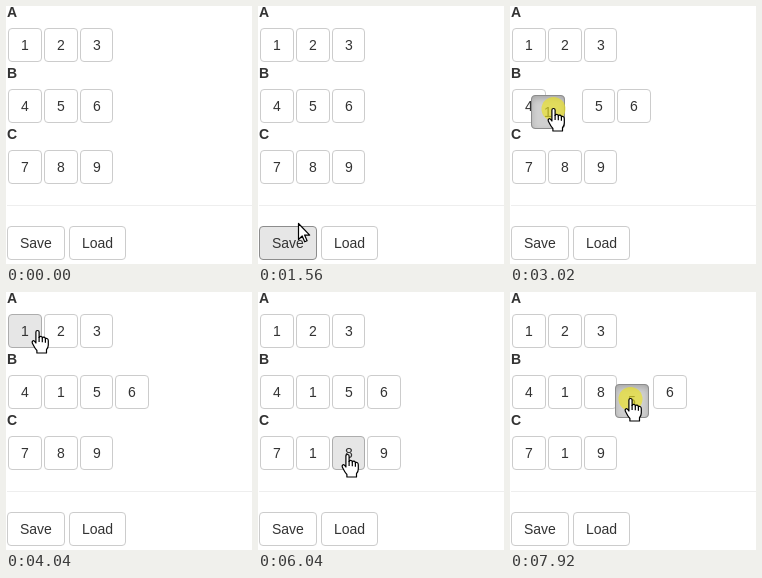
An HTML page with a canvas that plays this animation: 246 px wide and 258 px high, repeating every 7990 ms.

```html
<!DOCTYPE html>
<html lang="en">
<head>
<meta charset="utf-8">
<title>Sortable buttons</title>
<style>
  html, body { margin: 0; width: 100%; height: 100%; overflow: hidden; background: #fff; }
  canvas { display: block; width: 246px; height: 258px; }
</style>
</head>
<body>
<canvas id="stage"></canvas>
<script>
const W = 246, H = 258, LOOP = 7990;
const FONT = '14px "Liberation Sans", Arial, sans-serif';
const ITEM = 33.79, GAP = 2, ROW = 61;

const canvas = document.getElementById('stage');
const dpr = window.devicePixelRatio || 1;
canvas.width = W * dpr;
canvas.height = H * dpr;
const ctx = canvas.getContext('2d');

// Pointer moves: first step, last step, number of steps, destination.
const START = [195, 250];
const MOVES = [
  [150, 700, 8, 41, 235],
  [1410, 2180, 11, 24, 36],
  [2330, 3020, 10, 43, 103],
  [3190, 3190, 1, 44, 103],
  [3420, 4040, 9, 31, 39],
  [4120, 4180, 2, 29, 39],
  [4250, 4940, 10, 51, 158],
  [5110, 5330, 4, 58, 160],
  [5500, 6040, 8, 89, 163],
  [6200, 6740, 8, 80, 109],
  [6900, 6970, 2, 83, 108],
  [7460, 7690, 4, 124, 98],
  [7770, 7920, 3, 120, 107]
];

// Row contents over time; "_" is the open slot of the dragged item.
const LAYOUTS = [
  [0, '123/456/789'],
  [2330, '_23/456/789'],
  [2790, '123/4_56/789'],
  [3420, '123/4156/789'],
  [4250, '_23/4156/789'],
  [4480, '123/4_156/789'],
  [4780, '123/4156/7_89'],
  [5500, '123/4156/7189'],
  [6200, '123/4156/71_9'],
  [6580, '123/41_56/719'],
  [7220, '123/41856/719'],
  [7690, '123/418_6/719']
];

// Press, drop, label, grab offset.
const DRAGS = [
  [2330, 3420, '1', 22, 14],
  [4250, 5500, '1', 27, 17],
  [6200, 7220, '8', 15, 19],
  [7690, LOOP, '5', 15, 15]
];

const PRESSES = [[950, 1180], [2330, 3420], [4250, 5500], [6200, 7460], [7690, LOOP]];

const STYLES = {
  normal: ['#fff', '#ccc'],
  hover: ['#e6e6e6', '#adadad'],
  focus: ['#e6e6e6', '#8c8c8c'],
  active: ['#d0d0d0', '#8c8c8c']
};

const HAND = new Path2D('M-1.6 12.5V1.6Q-1.6 0 0 0Q1.6 0 1.6 1.6V7Q2.2 5.6 3.4 5.8Q4.8 6 4.8 7.6' +
  'Q5.4 6.4 6.6 6.7Q7.9 7 7.9 8.5Q8.5 7.6 9.5 8Q10.8 8.5 10.8 10.2V14.5Q10.8 17 9 19.2V22.5H-.6V20' +
  'Q-2.6 18-4.6 13.8Q-6 11.2-4.8 10.4Q-3.6 9.6-2.4 11.4Z');
const KNUCKLES = new Path2D('M1.6 6.5V11.5M4.8 7.5V11.8M7.9 8.5V12.2');
const ARROW = new Path2D('M0 0V16L3.7 12.5L6.2 18.3L8.6 17.2L6.1 11.6H11.2Z');

const within = (t, [from, to]) => t >= from && t < to;
const ease = p => p * p * (3 - 2 * p);

function pointerAt(t) {
  let [x, y] = START;
  for (const [from, to, steps, tx, ty] of MOVES) {
    if (t < from) break;
    const done = to > from ? (t - from) / (to - from) : 1;
    const step = Math.min(steps, Math.floor(done * (steps - 1) + 0.001) + 1);
    const p = ease(step / steps);
    x += (tx - x) * p;
    y += (ty - y) * p;
  }
  return { x, y };
}

function text(label, x, y, bold) {
  ctx.font = (bold ? 'bold ' : '') + FONT;
  ctx.fillStyle = '#333';
  ctx.fillText(label, x, y);
}

function button(label, x, y, w, state) {
  const [fill, border] = STYLES[state];
  ctx.beginPath();
  ctx.roundRect(x + 0.5, y + 0.5, w - 1, 33, 3.5);
  ctx.fillStyle = fill;
  ctx.fill();
  if (state === 'active') insetShadow(x, y, w);
  ctx.beginPath();
  ctx.roundRect(x + 0.5, y + 0.5, w - 1, 33, 3.5);
  ctx.lineWidth = 1;
  ctx.strokeStyle = border;
  ctx.stroke();
  text(label, x + 13, y + 22);
}

function insetShadow(x, y, w) {
  ctx.save();
  ctx.clip();
  ctx.beginPath();
  ctx.rect(x - 20, y - 20, w + 40, 74);
  ctx.roundRect(x, y, w, 34, 4);
  ctx.shadowColor = 'rgba(0,0,0,.22)';
  ctx.shadowBlur = 7 * dpr;
  ctx.shadowOffsetY = 3 * dpr;
  ctx.fillStyle = '#000';
  ctx.fill('evenodd');
  ctx.restore();
}

function cursor({ x, y }, hand) {
  ctx.save();
  ctx.translate(Math.round(x) + 0.5, Math.round(y) - 0.5);
  ctx.lineJoin = 'round';
  ctx.lineWidth = 1.2;
  ctx.fillStyle = '#fff';
  ctx.strokeStyle = '#000';
  const shape = hand ? HAND : ARROW;
  ctx.fill(shape);
  ctx.stroke(shape);
  if (hand) ctx.stroke(KNUCKLES);
  ctx.restore();
}

function draw(t) {
  ctx.setTransform(dpr, 0, 0, dpr, 0, 0);
  ctx.fillStyle = '#fff';
  ctx.fillRect(0, 0, W, H);

  const visible = t >= MOVES[0][0];
  const pos = pointerAt(t);
  const drag = DRAGS.find(d => within(t, d));
  let overButton = !!drag;

  const isOver = (x, y, w) => {
    const over = visible && !drag && pos.x >= x && pos.x < x + w && pos.y >= y && pos.y < y + 34;
    overButton = overButton || over;
    return over;
  };

  const rows = LAYOUTS.filter(l => t >= l[0]).pop()[1].split('/');
  rows.forEach((items, r) => {
    text('ABC'[r], 1, 11 + ROW * r, true);
    const y = 22 + ROW * r;
    let left = 2;
    for (const item of items) {
      if (item === '_') {
        left += ITEM;
        continue;
      }
      const x = Math.round(left), w = Math.round(left + ITEM) - x;
      button(item, x, y, w, isOver(x, y, w) ? 'hover' : 'normal');
      left += ITEM + GAP;
    }
  });

  ctx.fillStyle = '#eee';
  ctx.fillRect(1, 199, W - 1, 1);

  let save = isOver(1, 220, 58) ? 'hover' : 'normal';
  if (within(t, [950, 1110])) save = 'active';
  else if (within(t, [1110, 2330])) save = 'focus';
  button('Save', 1, 220, 58, save);
  button('Load', 63, 220, 57, isOver(63, 220, 57) ? 'hover' : 'normal');

  if (drag) {
    const [, , label, dx, dy] = drag;
    button(label, Math.round(pos.x - dx), Math.round(pos.y - dy), 34, 'active');
  }
  if (PRESSES.some(p => within(t, p))) {
    ctx.beginPath();
    ctx.arc(pos.x + 0.5, pos.y, 12, 0, Math.PI * 2);
    ctx.fillStyle = 'rgba(235,226,30,.65)';
    ctx.fill();
  }
  if (visible) cursor(pos, overButton);
}

const begin = performance.now();
function tick() {
  draw((performance.now() - begin) % LOOP);
  requestAnimationFrame(tick);
}
tick();
</script>
</body>
</html>
```
